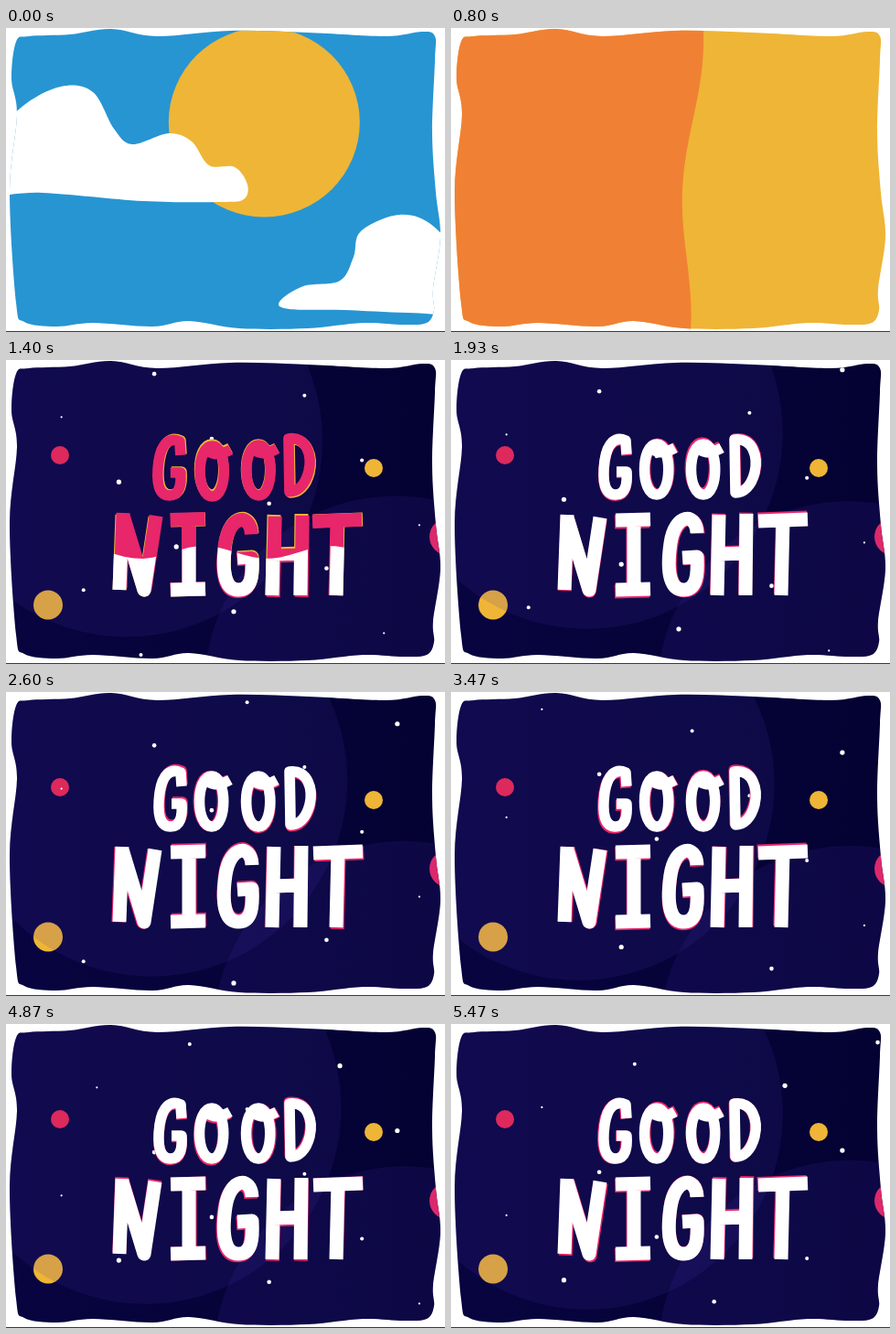
Animation, 480 px wide and 332 px high, one loop 5.54 s. Source, as an HTML page:

```html
<!DOCTYPE html>
<html lang="en">
<head>
<meta charset="utf-8">
<title>Good Night</title>
<style>
html, body { margin: 0; width: 100%; height: 100%; overflow: hidden; background: #fff; }
svg { display: block; width: 100vw; height: 100vh; }
.letters { fill: none; stroke-linejoin: round; }
.good { stroke-width: 11.5; }
.night { stroke-width: 15; }
</style>
</head>
<body>
<svg viewBox="0 0 480 332" role="img" aria-label="Good Night">
  <defs>
    <clipPath id="card"><path id="cardShape"/></clipPath>
    <clipPath id="nightClip"><path id="nightEdge"/></clipPath>
    <linearGradient id="space">
      <stop offset="0" stop-color="#080440"/>
      <stop offset="1" stop-color="#040232"/>
    </linearGradient>
  </defs>
  <g clip-path="url(#card)">
    <g id="day">
      <rect width="480" height="332" fill="#2795d2"/>
      <ellipse cx="282.3" cy="103" rx="104.5" ry="103.5" fill="#efb536"/>
      <path id="cloudL" fill="#fff"/>
      <path id="cloudR" fill="#fff"/>
    </g>
    <g id="wipes"></g>
    <g clip-path="url(#nightClip)">
      <rect width="480" height="332" fill="url(#space)"/>
      <circle cx="59" cy="104" r="10" fill="#f8284f"/>
      <circle cx="46" cy="267.5" r="16" fill="#efb536"/>
      <circle cx="402" cy="118" r="10" fill="#efb536"/>
      <circle cx="483" cy="193" r="20" fill="#f0285f"/>
      <circle id="glowB" r="209" fill="#5034c0" fill-opacity=".13"/>
      <circle id="glowA" r="214" fill="#4634aa" fill-opacity=".15"/>
      <g id="stars" fill="#fff"></g>
      <g id="words"></g>
    </g>
  </g>
  <rect y="331" width="480" height="1" fill="#3a3a3a"/>
</svg>
<script>
const LOOP = 5540;
const WIPE_SPEED = 2, STAR_SPEED = 0.036;
const $ = id => document.getElementById(id);
const clamp = (v, a = 0, b = 1) => Math.min(b, Math.max(a, v));
const ease = k => (1 - Math.cos(Math.PI * clamp(k))) / 2;
const show = (el, on) => set(el, { visibility: on ? 'visible' : 'hidden' });

function set(el, attrs) {
  for (const k in attrs) el.setAttribute(k, attrs[k]);
  return el;
}
function add(parent, tag, attrs) {
  return parent.appendChild(set(document.createElementNS('http://www.w3.org/2000/svg', tag), attrs));
}

// Closed Catmull-Rom curve through "x,y x,y ..."
function blob(text) {
  const pts = text.split(' ').map(p => p.split(',').map(Number));
  const at = i => pts[(i + pts.length) % pts.length];
  const ctl = (p, from, to) => p.map((v, j) => v + (to[j] - from[j]) / 6);
  return 'M' + pts[0] + pts.map((p, i) => {
    const next = at(i + 1);
    return 'C' + [ctl(p, at(i - 1), next), ctl(next, at(i + 2), p), next].join(' ');
  }).join('') + 'Z';
}

// Card outline and clouds, by their bends
set($('cardShape'), { d: blob(
  '25,9 70,7 115,1 165,9 245,3 330,5 415,9 455,4 469,9 469,35 466,115 470,180 475,228 467,285 468,308 ' +
  '460,322 435,324 390,322 330,328 255,328 200,320 160,326 95,322 55,326 20,321 11,300 4,178 12,95 6,55 11,15') });
set($('cloudL'), { d: blob(
  '-30,181 40,180 150,189 235,190 260,187 264,171 250,152 222,150 203,124 178,115 138,127 118,110 95,70 60,64 15,88 -30,140') });
set($('cloudR'), { d: blob(
  '510,310 440,311 370,308 310,307 299,299 325,282 365,276 380,250 388,222 430,204 468,217 510,270') });

// Sweeping layers: time at which the edge starts at x, its lean and its sway
const wipes = [
  { fill: '#efb536', time: 670, x: 267, lean: 0.045, sway: 8 },
  { fill: '#f08134', time: 800, x: 267, lean: 0.045, sway: 8 },
  { fill: '#f0284f', time: 935, x: 267, lean: 0.045, sway: 8 },
  { fill: '#3a00d0', time: 1070, x: 489, lean: 0.235, sway: 0 },
  { time: 1070, x: 303, lean: 0.085, sway: 7 }
];
for (const w of wipes) w.el = w.fill ? add($('wipes'), 'path', { fill: w.fill }) : $('nightEdge');

function wipePath(w, t) {
  const x = w.x + clamp((t - w.time) * WIPE_SPEED, -600, 600);
  let d = 'M-900 0';
  for (let y = 0; y <= 336; y += 8) {
    d += `L${x - w.lean * y + w.sway * Math.cos((y - 25) / 48)} ${y}`;
  }
  return d + 'H-900Z';
}

// Stars spread evenly by the golden ratio, every fifth one small
for (let i = 0; i < 20; i++) {
  add($('stars'), 'circle', {
    cx: 40 + 430 * ((0.25 + i * 0.618) % 1),
    cy: 341 - i * 23.6,
    r: i % 5 === 1 ? 1.1 : 2 + (i % 3) * 0.3
  });
}

// Lettering as thick centre lines
const O = x => `M${x} 92c-18 0-18 55 0 55c17 0 17-55 0-55M${x - 8} 93q8 14 28 3`;
const GOOD = [
  'M192 103L191 88C180 83 171 90 168 110C165 133 168 147 180 147C191 147 193 135 192 122L181 122',
  O(225), O(276),
  'M310 87C330 84 336 106 332 123C328 138 320 145 311 145Z'
];
const NIGHT = [
  'M127 169L124 251M127 172L151 251L163 172',
  'M180 175L218 174M200 174L200 250M180 251L218 250',
  'M269 189C268 166 245 167 240 200C235 235 241 251 254 251C269 251 270 234 269 215L253 216',
  'M293 169L291 257M292 212L323 211M323 168L322 257',
  'M336 176L390 174M363 174L361 257'
];

// Each colour floods the words from below
const floods = [
  { stroke: '#efb536', from: 980 },
  { stroke: '#e8266a', from: 1150 },
  { stroke: '#fff', from: 1300 }
];
floods.forEach((f, i) => {
  const clip = add(add($('words'), 'clipPath', { id: 'flood' + i }), 'path', {});
  const el = add($('words'), 'g', { class: 'letters', stroke: f.stroke, 'clip-path': `url(#flood${i})` });
  for (const d of GOOD) add(el, 'path', { d, class: 'good' });
  for (const d of NIGHT) add(el, 'path', { d, class: 'night' });
  Object.assign(f, { clip, el });
});
const [gold, pink] = floods;

function floodPath(t, from) {
  const level = 270 - 215 * ease((t - from) / 285);
  let d = 'M80 300';
  for (let x = 80; x <= 420; x += 10) d += `L${x} ${level + 7 * Math.sin(x / 22 + t / 70)}`;
  return d + 'V300Z';
}

function draw(t) {
  show($('day'), t < 800);
  show($('wipes'), t < 1350);
  set($('cloudL'), { transform: `translate(${t * 0.012} 0)` });
  set($('cloudR'), { transform: `translate(${-t * 0.012} 0)` });
  for (const w of wipes) set(w.el, { d: wipePath(w, t) });

  // One disc circles inward, the other slides in and bobs
  const turn = t * 0.0025, reach = 20 * (1 - 0.8 * t / LOOP);
  set($('glowA'), { cx: 147 + reach * Math.cos(turn), cy: 94 + reach * Math.sin(turn) });
  set($('glowB'), {
    cx: 436 - 30 * Math.exp(-Math.max(0, t - 1070) / 300),
    cy: 366 + 11 * Math.cos((t - 3450) / 830)
  });
  set($('stars'), { transform: `translate(0 ${(t - 1930) * STAR_SPEED})` });

  for (const f of floods) set(f.clip, { d: floodPath(t, f.from) });
  show(gold.el, t < 1600);
  [...pink.el.children].forEach((letter, i) => {
    const x = 1.2 * Math.sin(t / 310 + i * 2.3);
    const y = 2 * Math.cos(t / 270 + i * 1.1);
    set(letter, { transform: `translate(${x} ${y})` });
  });
}

const start = performance.now();
function tick() {
  draw((performance.now() - start) % LOOP);
  requestAnimationFrame(tick);
}
draw(0);
requestAnimationFrame(tick);
</script>
</body>
</html>
```
